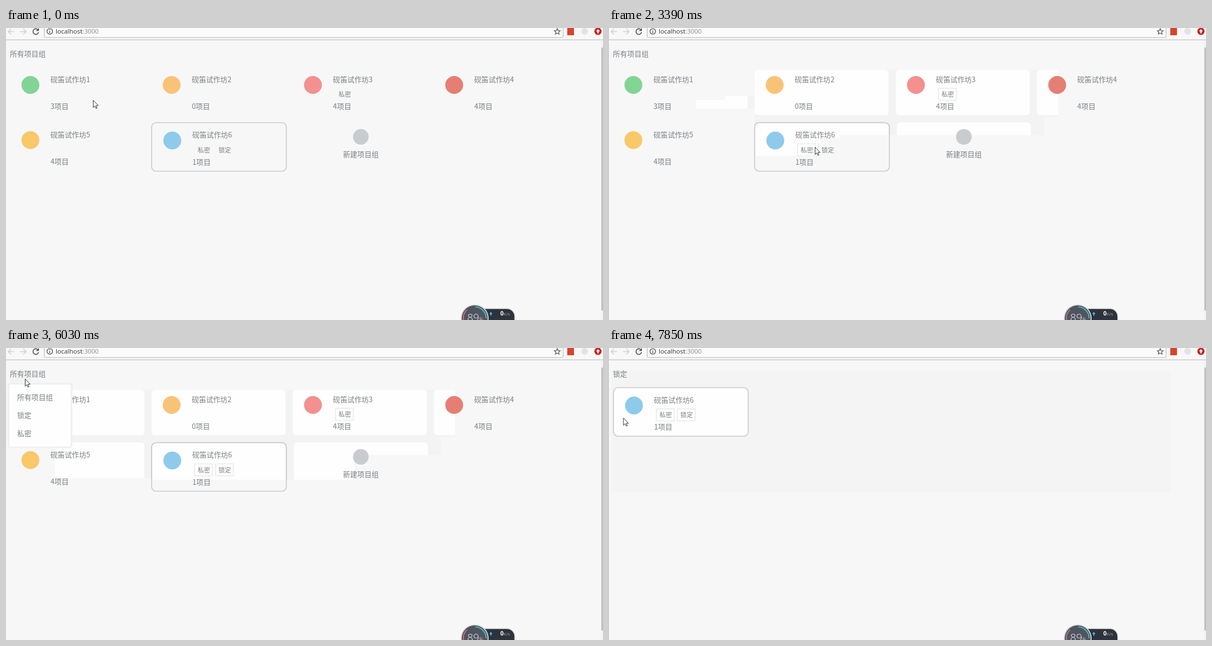
An HTML page that plays this animation: 1070 by 523 pixels, repeating every 8 s.

```html
<!DOCTYPE html>
<html lang="zh-CN">
<head>
<meta charset="utf-8">
<title>项目组</title>
<style>
html, body { margin: 0; width: 100%; height: 100%; overflow: hidden; background: #f7f7f7; }
svg { display: block; }
text { font-family: "Noto Sans CJK SC", "Noto Sans CJK", "Noto Sans CJK JP", sans-serif; fill: #7b7f83; white-space: pre; }
.latin { font-family: "Open Sans", "Noto Sans", sans-serif; }
</style>
</head>
<body>
<svg id="stage" width="1070" height="523" viewBox="0 0 1070 523"></svg>
<script>
const LOOP = 8000, FILTER_AT = 7260, MENU_AT = 5660;
const COL = [0, 1, 2, 3].map(i => 7.7 + 253.2 * i);

// Cursor steps: time, kind, x, y
const moves = [
  [0, 'arrow', 156, 129], [150, 'arrow', 180, 129], [280, 'arrow', 208, 128],
  [420, 'arrow', 297, 122], [540, 'arrow', 346, 115], [1130, 'arrow', 485, 109],
  [1280, 'arrow', 559, 107], [1430, 'arrow', 581, 111], [2120, 'arrow', 584, 111],
  [2240, 'arrow', 588, 111], [2550, 'arrow', 613, 112], [2700, 'arrow', 795, 143],
  [2850, 'arrow', 769, 133], [2970, 'arrow', 403, 177], [3120, 'arrow', 350, 182],
  [3270, 'arrow', 358, 196], [3390, 'arrow', 369, 213], [3820, 'arrow', 374, 206],
  [3940, 'arrow', 470, 209], [4060, 'hand', 609, 216], [4310, 'hand', 608, 215],
  [4440, 'hand', 583, 214], [4580, 'arrow', 88, 159], [4700, 'arrow', 11, 95],
  [4850, 'arrow', 25, 76], [4970, 'arrow', 35, 54], [5110, 'beam', 38, 42],
  [5230, 'beam', 38, 37], [6030, 'arrow', 34, 55], [6150, 'arrow', 29, 72],
  [6310, 'beam', 26, 81], [6460, 'beam', 26, 82], [6710, 'beam', 24, 87],
  [6860, 'beam', 19, 120], [7850, 'arrow', 25.5, 125]
];

// Areas where the white cards show: time, left, top, right, bottom
const areas = [
  [150, 156, 129, 190, 144], [280, 156, 129, 218, 144], [420, 208, 122, 307, 144],
  [540, 261, 75, 356, 137], [1130, 346, 75, 495, 131], [1280, 486, 75, 570, 124],
  [1430, 560, 107, 590, 127], [2700, 514, 75, 805, 159], [2970, 261, 75, 779, 192],
  [3120, 261, 169, 413, 197], [3390, 261, 169, 379, 229], [4060, 261, 169, 625, 236],
  [4580, 88, 75, 598, 233], [4700, 8, 75, 98, 175], [4850, 8, 54, 45, 110],
  [5230, 8, 42, 45, 71], [MENU_AT, 4, 63, 120, 180]
];

const text = (x, cy, s, size = 12.8, extra = '') =>
  `<text x="${x}" y="${cy + size * .38}" font-size="${size}" ${extra}>${s}</text>`;
const rect = (x, y, w, h, fill, extra = '') =>
  `<rect x="${x}" y="${y}" width="${w}" height="${h}" fill="${fill}" ${extra}/>`;
const disc = (x, y, r, fill) => `<circle cx="${x}" cy="${y}" r="${r}" fill="${fill}"/>`;
const line = (d, color, w = 1, extra = '') =>
  `<path d="${d}" fill="none" stroke="${color}" stroke-width="${w}" ${extra}/>`;
const white = (x, y, w = 240, h = 81) => rect(x, y, w, h, '#fefefe', 'rx="6"');

const item = (x, y, color, n, count) =>
  disc(x + 36, y + 27, 16, color) + text(x + 72, y + 17, '砚笛试作坊' + n) +
  text(x + 72, y + 65.5, count + '项目');
const tag = (x, y, s) => text(x + 6, y + 11.5, s, 11.2);
const tagBox = (x, y) => rect(x + .5, y + .5, 32, 21.5, '#fefefe', 'stroke="#e9e9e9" stroke-width="1.5"');
const outline = (x, y, fill) =>
  rect(x, y, 241.5, 87, fill, 'rx="8" stroke="#c9cacb" stroke-width="1.6"');

function chrome() {
  const star = Array.from({ length: 10 }, (_, i) => {
    const a = i * Math.PI / 5, r = i % 2 ? 2.5 : 5.6;
    return (988 + r * Math.sin(a)).toFixed(1) + ',' + (6.6 - r * Math.cos(a)).toFixed(1);
  }).join(' ');
  return rect(0, 0, 1070, 21, '#f8f8f8') +
    rect(68.5, -8, 930, 25, '#fbfbfb', 'rx="2" stroke="#b4b4b4"') +
    line('M0 21.2H1070', '#b6b6b6') +
    line('M14 6.5H4M9 1.5L4 6.5L9 11.5', '#cfcfcf', 1.6) +
    line('M25 6.5H36M31 1.5L36 6.5L31 11.5', '#cfcfcf', 1.6) +
    line('M57.2 3.2A5 5 0 1 0 58.3 7.5', '#555', 1.7) +
    '<path d="M59 0V5.3H53.7Z" fill="#555"/>' +
    line('M78.5 5.5V9M78.5 2.8V4.2', '#444', 1.3) +
    '<circle cx="78.5" cy="6" r="5" fill="none" stroke="#444" stroke-width="1.2"/>' +
    '<text class="latin" x="89" y="10.3" font-size="11.45" style="fill:#333">localhost<tspan fill="#888">:3000</tspan></text>' +
    `<polygon points="${star}" fill="none" stroke="#555" stroke-width="1.2"/>` +
    rect(1006, 0, 12, 13, '#d8432f') + disc(1037, 6, 6, '#e3e3e3') +
    disc(1061, 6, 6.5, '#c5221f') +
    '<path d="M1061 2L1064.7 6H1062.3V9.5H1059.7V6H1057.3Z" fill="#fff"/>' +
    rect(1066, 22, 4, 501, '#f3f3f3') + rect(1067, 35, 3, 471, '#c0c0c0');
}

function gauge() {
  return rect(820, 502.5, 92, 40, '#2e323c', 'rx="14" stroke="#dfe1e3" stroke-width="1.5"') +
    disc(840, 520, 25, '#d6dadc') + disc(840, 520, 23.2, '#505461') +
    line('M841 499.5A20.5 20.5 0 0 1 860.5 520', '#45d0bd', 1.6) +
    line('M820 523A20.5 20.5 0 0 1 826 505', '#d9766a', 1.6) +
    '<text class="latin" x="826.5" y="525" font-size="19" font-weight="300" style="fill:#eef0f2">89<tspan font-size="8.5">%</tspan></text>' +
    '<path d="M869 508.5L872 512H870V515H868V512H866Z" fill="#49b4e6"/>' +
    '<text class="latin" x="886" y="515" font-size="10" font-weight="700" style="fill:#fff">0<tspan font-size="8" font-weight="400" fill="#a3a7ad">K/s</tspan></text>';
}

const grid =
  '<g id="cards" clip-path="url(#shown)">' + rect(0, 22, 1066, 240, '#f3f3f3') +
  [8, 261, 514, 767].map(x => white(x, 75)).join('') + white(8, 71, 60, 20) +
  white(8, 169) + white(516, 169) + outline(261, 169.5, '#fefefe') +
  tagBox(590, 107.5) + tagBox(337.5, 207) + tagBox(375, 207) + '</g>' +
  outline(261, 169.5, 'none') +
  item(COL[0], 75, '#82d494', 1, 3) + item(COL[1], 75, '#f9c377', 2, 0) +
  item(COL[2], 75, '#f4908f', 3, 4) + item(COL[3], 75, '#e57f73', 4, 4) +
  item(COL[0], 173.8, '#f8c869', 5, 4) + item(262, 174.5, '#8dcaec', 6, 1) +
  tag(590, 107.5, '私密') + tag(337.5, 207.5, '私密') + tag(375, 207.5, '锁定') +
  disc(636, 195, 14, '#c9cccf') + text(636, 226.5, '新建项目组', 12.8, 'text-anchor="middle"') +
  text(7, 46.5, '所有项目组');

const menu =
  rect(4.5, 64, 113, 114, '#fefefe', 'rx="4" stroke="#f0f0f0" stroke-width="3"') +
  rect(12, 0, 95, 32.5, '#f5f6f7', 'id="hover"') +
  ['所有项目组', '锁定', '私密'].map((s, i) =>
    text(20, 88 + i * 32.6, s, 12.8, 'class="option"')).join('');

const filtered =
  rect(5, 40, 1001, 218, '#f4f4f4') + text(7, 46.5, '锁定') +
  outline(8, 71, '#fefefe') + item(8.8, 76, '#8dcaec', 6, 1) +
  tagBox(84.5, 108.5) + tagBox(122, 108.5) + tag(84.5, 108.5, '私密') + tag(122, 108.5, '锁定');

const pointers = {
  arrow: '<path d="M.4 .4V13.4L3.4 10.7L5.4 15L7.3 14.2L5.4 9.9H9.4Z" fill="#fff" stroke="#111" stroke-width=".85" stroke-linejoin="round"/>',
  hand: '<path d="M4.5 12V2a1.5 1.5 0 0 1 3 0V7.5q2.6-.8 2.8.8q2-.5 2.3 1q1.9-.3 1.9 1.5V14q0 3-2 5.5H6q-1.5-3-4.8-7q-.8-2 1-2q1 0 2.3 1.5Z" fill="#fff" stroke="#222"/>' +
    line('M7.5 7V11M10.3 8.5V11.5M12.6 9.5V12', '#222', .8),
  beam: line('M0 .5H3M4 .5H7M3.5 1V12.5M0 12.5H3M4 12.5H7', '#222')
};

const $ = id => document.getElementById(id);
$('stage').innerHTML =
  '<defs><clipPath id="shown"><path id="shownPath" d=""/></clipPath></defs>' +
  rect(0, 0, 1070, 523, '#f7f7f7') + chrome() +
  `<g id="grid">${grid}</g><g id="menu">${menu}</g><g id="filtered">${filtered}</g>` +
  gauge() +
  Object.keys(pointers).map(k => `<g id="${k}">${pointers[k]}</g>`).join('');

const options = document.querySelectorAll('.option');
const show = (id, on) => { $(id).style.display = on ? '' : 'none'; };

function draw(t) {
  show('grid', t < FILTER_AT);
  show('filtered', t >= FILTER_AT);
  show('menu', t >= MENU_AT && t < FILTER_AT);

  $('shownPath').setAttribute('d', areas.filter(a => a[0] <= t)
    .map(([, l, top, r, b]) => `M${l} ${top}H${r}V${b}H${l}Z`).join(''));

  const active = t >= 6860 ? 1 : t >= 6310 ? 0 : -1;
  show('hover', active >= 0);
  $('hover').setAttribute('y', 71.5 + 32.5 * active);
  options.forEach((o, i) => { o.style.fill = i === active ? '#86c2ea' : ''; });

  const [, kind, x, y] = moves.filter(m => m[0] <= t).pop();
  for (const k in pointers) show(k, k === kind);
  $(kind).setAttribute('transform', `translate(${x} ${y})`);
}

const start = performance.now();
function tick() {
  draw((performance.now() - start) % LOOP);
  requestAnimationFrame(tick);
}
tick();
</script>
</body>
</html>
```
